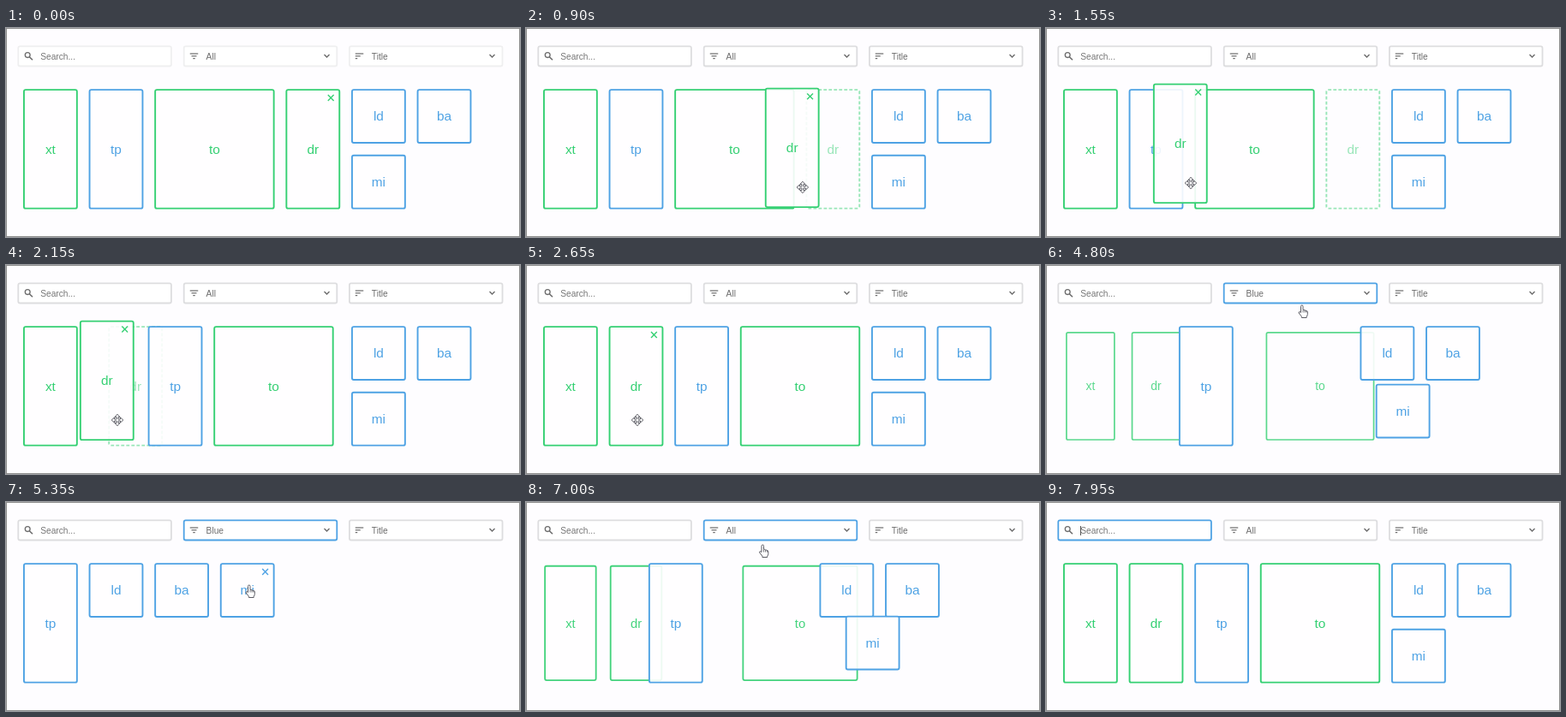
An HTML page with a canvas that plays this animation: 600 by 244 pixels, repeating every 8000 ms.

```html
<!DOCTYPE html>
<html lang="en">
<head>
<meta charset="utf-8">
<title>Sortable grid</title>
<style>
html, body { margin: 0; width: 100%; height: 100%; overflow: hidden; background: #fefdff; }
canvas { display: block; }
</style>
</head>
<body>
<canvas id="stage" width="600" height="244"></canvas>
<script>
const ctx = document.getElementById('stage').getContext('2d');
const LOOP = 8000, UNIT = 63.8, PITCH = 76.6, X0 = 20, Y0 = 71.2;
const GREEN = '#35d073', BLUE = '#4ea2e4', GREY = '#dddddf', INK = '#6c6c6c';
const FONT = '"Liberation Sans", Arial, sans-serif';

// Event times in ms
const GRAB = 600, SORT = 1900, DROP = 2200, FOCUS = 3300, FILTER = 4754, RESET = 6800, SEARCH = 7950;
const MOVE = 400, FADE = 300;

// Grid cells [column, row]: at start, after sorting, while filtered
const items = [
  { name: 'xt', color: GREEN, w: 1, h: 2, cells: [[0, 0], [0, 0], [0, 0]] },
  { name: 'to', color: GREEN, w: 2, h: 2, cells: [[2, 0], [3, 0], [3, 0]] },
  { name: 'dr', color: GREEN, w: 1, h: 2, cells: [[4, 0], [1, 0], [1, 0]] },
  { name: 'tp', color: BLUE, w: 1, h: 2, cells: [[1, 0], [2, 0], [0, 0]] },
  { name: 'ld', color: BLUE, w: 1, h: 1, cells: [[5, 0], [5, 0], [1, 0]] },
  { name: 'ba', color: BLUE, w: 1, h: 1, cells: [[6, 0], [6, 0], [2, 0]] },
  { name: 'mi', color: BLUE, w: 1, h: 1, cells: [[5, 1], [5, 1], [3, 0]] }
];
const dragged = items[2];

// Pointer path: time, x, y
const path = [
  [GRAB, 370.5, 187.5], [1550, 169, 181], [2050, 130, 181], [2700, 130, 181],
  [3050, 304, 35], [3700, 304, 35], [3850, 300, 54], [4850, 300, 54],
  [5200, 285, 104], [5600, 285, 104], [6000, 281, 42], [6250, 281, 42],
  [6500, 277.5, 57], [7600, 277.5, 57], [7850, 138, 55]
];

const clamp = v => Math.max(0, Math.min(1, v));
const mix = (a, b, p) => a + (b - a) * p;
const mixPoint = (a, b, p) => [mix(a[0], b[0], p), mix(a[1], b[1], p)];

// CSS "ease": cubic-bezier(.25, .1, .25, 1)
function ease(v) {
  const x = clamp(v);
  let lo = 0, hi = 1, u = x;
  for (let i = 0; i < 20; i++) {
    u = (lo + hi) / 2;
    const bx = 0.75 * u * (1 - u) + u * u * u;
    if (bx < x) lo = u; else hi = u;
  }
  return x === 0 || x === 1 ? x : 0.3 * u * (1 - u) ** 2 + 3 * u * u * (1 - u) + u ** 3;
}

function pointer(t) {
  const i = path.findIndex(k => k[0] > t);
  if (i === 0) return path[0].slice(1);
  if (i < 0) return path[path.length - 1].slice(1);
  const [a, b] = [path[i - 1], path[i]];
  const p = (t - a[0]) / (b[0] - a[0]);
  return mixPoint(a.slice(1), b.slice(1), p * p * (3 - 2 * p));
}

function slot(item, t) {
  const [start, sorted, filtered] = item.cells.map(([c, r]) => [X0 + c * PITCH, Y0 + r * PITCH]);
  if (t < FILTER) return mixPoint(start, sorted, ease((t - SORT) / MOVE));
  if (t < RESET) return mixPoint(sorted, filtered, ease((t - FILTER) / MOVE));
  return mixPoint(filtered, sorted, ease((t - RESET) / MOVE));
}

function place(item, t) {
  const home = slot(item, t);
  if (item !== dragged || t < GRAB || t > DROP + MOVE) return home;
  const hand = pointer(Math.min(t, DROP));
  const held = [0, 1].map(i => slot(item, 0)[i] + hand[i] - path[0][i + 1]);
  return mixPoint(held, home, ease((t - DROP) / MOVE));
}

function line(points, color, width) {
  ctx.beginPath();
  points.forEach(([x, y]) => ctx.lineTo(x, y));
  ctx.strokeStyle = color;
  ctx.lineWidth = width;
  ctx.stroke();
}

function box(x, y, w, h, color, width, fill) {
  ctx.beginPath();
  ctx.roundRect(x + width / 2, y + width / 2, w - width, h - width, 2);
  if (fill) { ctx.fillStyle = fill; ctx.fill(); }
  ctx.strokeStyle = color;
  ctx.lineWidth = width;
  ctx.stroke();
}

function text(str, x, y, size, color, align) {
  ctx.font = `${size}px ${FONT}`;
  ctx.textAlign = align;
  ctx.fillStyle = color;
  ctx.fillText(str, x, y);
}

function card(item, [x, y], { alpha = 1, scale = 1, hover = false, ghost = false }) {
  const w = UNIT + (item.w - 1) * PITCH, h = UNIT + (item.h - 1) * PITCH;
  ctx.save();
  ctx.globalAlpha = alpha;
  ctx.translate(x + w / 2, y + h / 2);
  ctx.scale(scale, scale);
  if (ghost) ctx.setLineDash([3.8, 2.2]);
  box(-w / 2, -h / 2, w, h, item.color, 1.9, ghost ? '' : 'rgba(255,254,255,.9)');
  ctx.setLineDash([]);
  text(item.name, 0, 5.3, 15.4, item.color, 'center');
  if (hover) {
    const cx = w / 2 - 11, cy = 10.3 - h / 2, r = 3.4;
    line([[cx - r, cy - r], [cx + r, cy + r]], item.color, 1.4);
    line([[cx + r, cy - r], [cx - r, cy + r]], item.color, 1.4);
  }
  ctx.restore();
}

function field(x, label, border, labelColor) {
  box(x, 20.4, 180.4, 25, border, 1.8, '#fff');
  text(label, x + 26.8, 36.7, 10.2, labelColor, 'left');
}

function bars(x, centred) {
  [9.5, 6, 2.5].forEach((w, i) => {
    const left = centred ? x - w / 2 : x - 4.75, y = 30 + i * 2.8;
    line([[left, y], [left + w, y]], INK, 1.2);
  });
}

function toolbar(t) {
  const idle = t < 400 ? '#efeff0' : GREY;
  const searching = t >= SEARCH;
  field(13.4, 'Search...', searching ? BLUE : idle, '#777');
  field(206.8, t >= FILTER && t < RESET ? 'Blue' : 'All', t >= FOCUS && !searching ? BLUE : idle, INK);
  field(400, 'Title', idle, INK);
  ctx.beginPath();
  ctx.arc(25.2, 31.6, 2.9, 0, 7);
  ctx.strokeStyle = INK;
  ctx.lineWidth = 1.3;
  ctx.stroke();
  line([[27.3, 33.7], [31, 37.3]], INK, 1.6);
  bars(219.5, true);
  bars(412.5, false);
  for (const x of [374.5, 567.5]) line([[x - 3, 31], [x, 34], [x + 3, 31]], INK, 1.4);
  if (searching) line([[40.5, 28], [40.5, 39]], '#555', 1);
}

const handShape = new Path2D('M-2.5 1.5V-5.5Q-2.5-7-1.2-7T0-5.5V-1.5Q1.4-2.4 2-.9Q3.3-1.7 3.9-.2Q5.3-.6 5.3 1V3.5Q5.3 5 4.2 6.2V7.5H-1.6V6.2L-4.9 2Q-5.2.6-3.8.6Z');
const arrowShape = new Path2D();
for (let i = 0; i < 4; i++) {
  const arm = new Path2D('M-1-1V-3.5H-3L0-6.8L3-3.5H1V-1');
  arrowShape.addPath(arm, new DOMMatrix().rotate(i * 90));
}

function drawPointer(t) {
  if (t < 400 || t >= SEARCH) return;
  const shape = t < 2750 ? arrowShape : handShape;
  ctx.save();
  ctx.translate(...pointer(t));
  ctx.fillStyle = '#fff';
  ctx.fill(shape);
  ctx.strokeStyle = '#5c5c64';
  ctx.lineWidth = 1;
  ctx.lineJoin = 'round';
  ctx.stroke(shape);
  if (shape === handShape) {
    for (const x of [0, 2, 3.9]) line([[x, -1], [x, 1.5]], '#5c5c64', 0.8);
  }
  ctx.restore();
}

function draw(t) {
  ctx.fillStyle = '#fefdff';
  ctx.fillRect(0, 0, 600, 244);
  toolbar(t);

  const hidden = t < RESET ? ease((t - FILTER) / FADE) : 1 - ease((t - RESET) / FADE);
  const dragging = t >= GRAB && t < DROP + MOVE;
  const [px, py] = pointer(t);
  if (dragging) card(dragged, slot(dragged, t), { alpha: 0.5, ghost: true });

  const order = dragging ? [...items.filter(i => i !== dragged), dragged] : items;
  for (const item of order) {
    const [x, y] = place(item, t);
    const gone = item.color === GREEN ? hidden : 0;
    const inside = px > x && px < x + UNIT + (item.w - 1) * PITCH &&
      py > y && py < y + UNIT + (item.h - 1) * PITCH;
    const hover = dragging ? item === dragged : inside;
    card(item, [x, y], { alpha: 1 - gone, scale: 1 - gone / 2, hover });
  }

  drawPointer(t);
  ctx.strokeStyle = '#8e8e8e';
  ctx.lineWidth = 1;
  ctx.strokeRect(0.5, 0.5, 599, 243);
}

let began;
function frame(now) {
  began ??= now;
  draw((now - began) % LOOP);
  requestAnimationFrame(frame);
}
draw(0);
requestAnimationFrame(frame);
</script>
</body>
</html>
```
